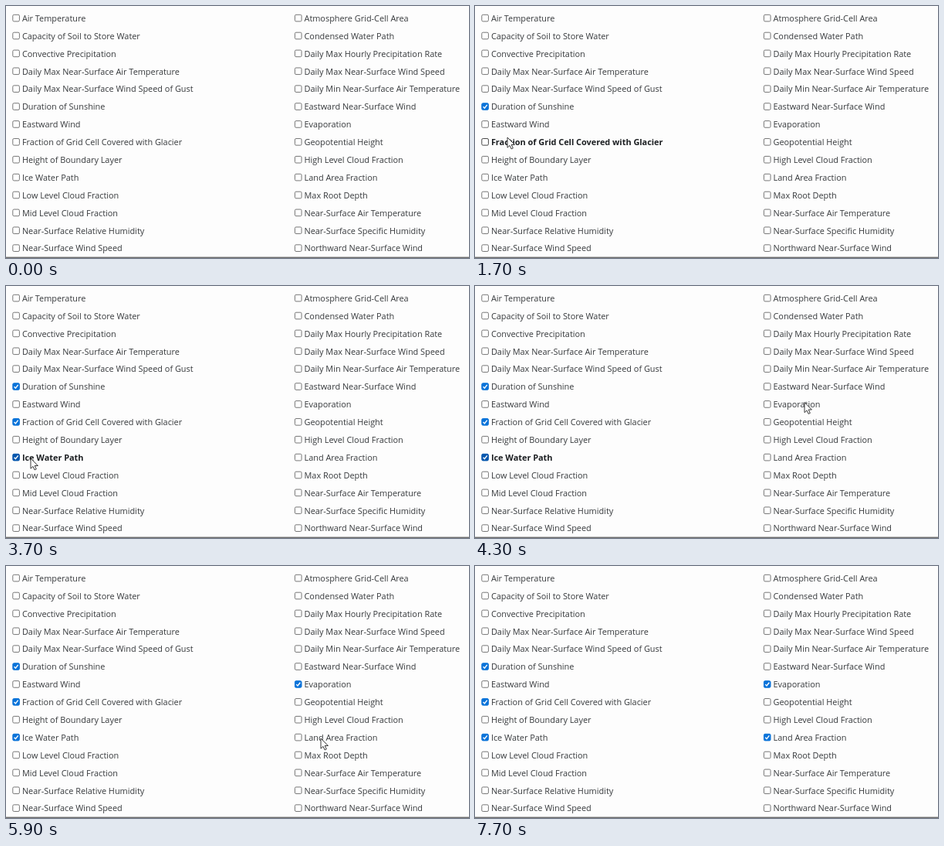
Recreate the animation shown at these times as an HTML page. Size 600 px wide and 326 px high, loop 8200 ms.

```html
<!DOCTYPE html>
<html lang="en">
<head>
<meta charset="utf-8">
<title>Variable checklist</title>
<style>
  html, body { margin: 0; width: 100%; height: 100%; overflow: hidden; background: #fdfdfd; }
  svg { display: block; }
  text { font: 10.9px "Open Sans", "Noto Sans", sans-serif; fill: #36393c; }
  .box { fill: #fff; stroke: #6f6f6f; stroke-width: .95; }
  .tick { fill: none; stroke: #fff; stroke-width: 1.4; visibility: hidden; }
  .hover text { font-weight: 700; fill: #1c1f22; }
  .hover .box { stroke: #3c3c3c; }
  .checked .box { fill: #0a73d9; stroke: #0a73d9; }
  .checked.hover .box { fill: #0556ad; stroke: #0556ad; }
  .checked .tick { visibility: visible; }
</style>
</head>
<body>
<svg id="stage" width="600" height="326" viewBox="0 0 600 326">
  <g id="list"></g>
  <rect y="324.6" width="600" height="1.4" fill="#6c6c6c"/>
  <path id="cursor" d="M0 0V13.2L3 10.4L5.1 14.9L7.3 13.9L5.2 9.5H9.4Z"
        fill="#fff" stroke="#222" stroke-width=".9" stroke-linejoin="round"/>
</svg>
<script>
const LOOP = 8200, STEP = 100;

const columns = [
  [8, ["Air Temperature", "Capacity of Soil to Store Water", "Convective Precipitation",
    "Daily Max Near-Surface Air Temperature", "Daily Max Near-Surface Wind Speed of Gust",
    "Duration of Sunshine", "Eastward Wind", "Fraction of Grid Cell Covered with Glacier",
    "Height of Boundary Layer", "Ice Water Path", "Low Level Cloud Fraction",
    "Mid Level Cloud Fraction", "Near-Surface Relative Humidity", "Near-Surface Wind Speed"]],
  [373.6, ["Atmosphere Grid-Cell Area", "Condensed Water Path", "Daily Max Hourly Precipitation Rate",
    "Daily Max Near-Surface Wind Speed", "Daily Min Near-Surface Air Temperature",
    "Eastward Near-Surface Wind", "Evaporation", "Geopotential Height",
    "High Level Cloud Fraction", "Land Area Fraction", "Max Root Depth",
    "Near-Surface Air Temperature", "Near-Surface Specific Humidity", "Northward Near-Surface Wind"]]
];

// label: time it gets ticked
const ticks = {
  "Duration of Sunshine": 900,
  "Fraction of Grid Cell Covered with Glacier": 2100,
  "Ice Water Path": 3000,
  "Evaporation": 5400,
  "Land Area Fraction": 6400
};

// [from, to, label]
const hovers = [
  [200, 1300, "Duration of Sunshine"],
  [1300, 1600, "Eastward Wind"],
  [1600, 2500, "Fraction of Grid Cell Covered with Glacier"],
  [2500, 2800, "Height of Boundary Layer"],
  [2800, 4400, "Ice Water Path"],
  [4400, 5500, "Evaporation"],
  [5600, 5800, "High Level Cloud Fraction"],
  [6000, 6900, "Land Area Fraction"]
];

// [time, x, y] of the pointer tip
const path = [
  [700, 34, 127], [900, 34, 127], [1300, 35, 142], [1400, 35, 142], [1700, 42, 170],
  [2300, 42, 171], [2700, 32, 227], [2800, 32, 223], [3800, 32, 223], [4300, 427, 150.5],
  [4500, 425, 152], [5000, 425, 152], [5300, 415, 201.5], [5900, 408, 223],
  [6500, 408, 223], [6800, 425, 247], [7300, 498, 328]
];

const items = {};
const list = document.getElementById("list");
const cursor = document.getElementById("cursor");

function add(tag, parent, attrs, text = "") {
  const el = document.createElementNS("http://www.w3.org/2000/svg", tag);
  for (const key in attrs) el.setAttribute(key, attrs[key]);
  el.textContent = text;
  return parent.appendChild(el);
}

for (const [x, labels] of columns) {
  labels.forEach((label, row) => {
    const g = add("g", list, { transform: `translate(${x} ${15.7 + row * 22.89})` });
    add("rect", g, { class: "box", x: .8, y: -4.4, width: 8.6, height: 8.6, rx: 1.5 });
    add("path", g, { class: "tick", d: "M2.6 .1L4.4 2L7.7 -2.3" });
    add("text", g, { x: 12.9, y: 4.2 }, label);
    items[label] = g;
  });
}

function pointerAt(t) {
  const i = path.findIndex(p => p[0] > t);
  if (i < 1) return null;
  const [t0, x0, y0] = path[i - 1], [t1, x1, y1] = path[i];
  const k = (t - t0) / (t1 - t0), e = k * k * (3 - 2 * k);
  return [x0 + (x1 - x0) * e, y0 + (y1 - y0) * e];
}

function draw(now) {
  const t = Math.floor(now % LOOP / STEP) * STEP;
  const hover = hovers.find(([from, to]) => t >= from && t < to);
  for (const label in items) {
    items[label].classList.toggle("checked", t >= ticks[label]);
    items[label].classList.toggle("hover", !!hover && hover[2] === label);
  }
  const tip = pointerAt(t);
  cursor.style.visibility = tip ? "visible" : "hidden";
  if (tip) cursor.setAttribute("transform", `translate(${tip})`);
}

const start = performance.now();
function frame() {
  draw(performance.now() - start);
  requestAnimationFrame(frame);
}
frame();
</script>
</body>
</html>
```
